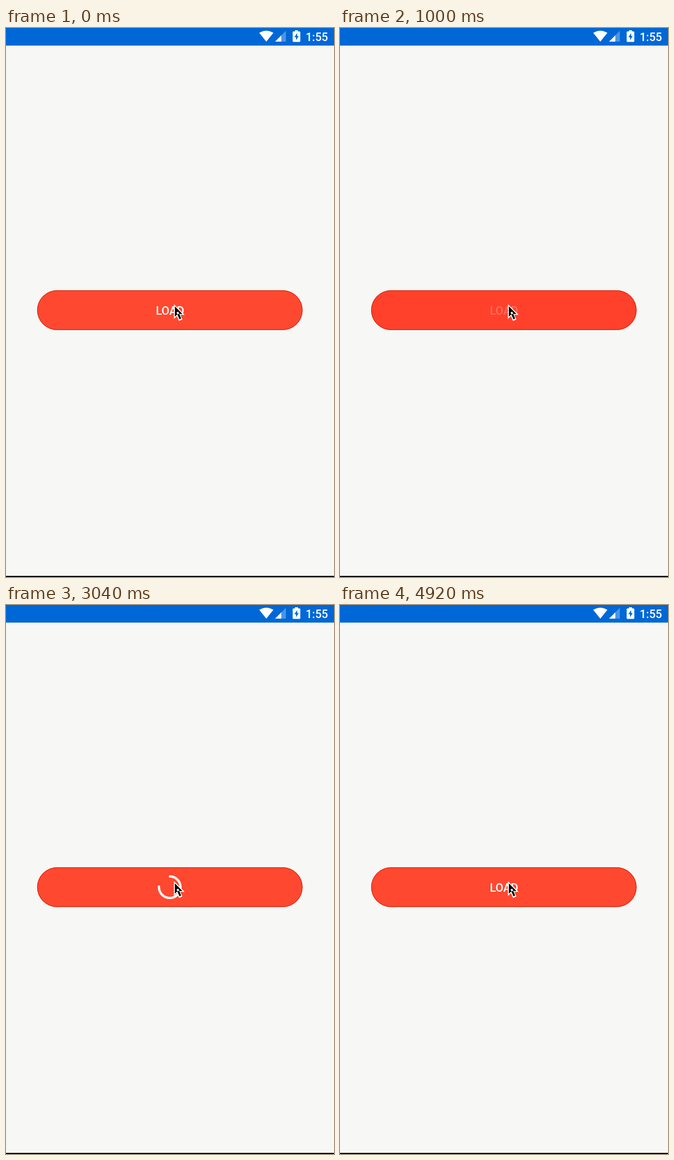
These frames come from a looping animation (579 px wide and 967 px high, 4960 ms). An HTML page:

```html
<!DOCTYPE html>
<html lang="en">
<head>
<meta charset="utf-8">
<title>Loading button</title>
<style>
  html, body { margin: 0; width: 100%; height: 100%; overflow: hidden; background: #f7f7f5; }
  svg { display: block; width: 579px; height: 967px; }
  text { font: 500 20px Roboto, sans-serif; fill: #fff; }
</style>
</head>
<body>
<svg viewBox="0 0 579 967">
  <rect width="579" height="967" fill="#f7f7f5"/>
  <rect width="579" height="31" fill="#0068d6"/>
  <rect y="965" width="579" height="2" fill="#000"/>

  <g fill="#fff">
    <path d="M459.5 24 L447 8.5 Q459.5 0.8 472 8.5 Z"/>
    <path d="M475 24 H494 V5 Z" opacity=".3"/>
    <path d="M475 24 H486 V13 Z"/>
    <path d="M510 4 H515.5 V6 H518 Q519.5 6 519.5 7.5 V23 Q519.5 24.5 518 24.5 H507.5 Q506 24.5 506 23 V7.5 Q506 6 507.5 6 H510 Z"/>
  </g>
  <path d="M514 9 L509 16.3 H512 V21.5 L516.7 14.2 H514 Z" fill="#0068d6"/>
  <text x="529" y="22.5">1:55</text>

  <rect x="55" y="462" width="468.5" height="70" rx="35" fill="#ff4830"/>
  <rect id="press" x="55" y="462" width="468.5" height="70" rx="35" fill="#f00"/>
  <rect x="55.5" y="462.5" width="467.5" height="69" rx="34.5" fill="none" stroke="#d01c04"/>
  <text id="label" x="289.5" y="504.5" text-anchor="middle">LOAD</text>
  <path id="spinner" fill="none" stroke="#fff" stroke-width="4" stroke-linecap="square"/>

  <g id="ring" fill="none">
    <circle cx="297.5" cy="490.3" stroke="#fff" stroke-width="4.2"/>
    <circle cx="297.5" cy="490.3" stroke="#000" stroke-width="2.4"/>
  </g>
  <g transform="translate(283.1 478.4) scale(1.63)">
    <path fill="#fff" d="M8.2 20.9V4.9L19.8 16.5H13L12.6 16.6Z M17.3 21.6L13.7 23.1L9 12L12.7 10.5Z"/>
    <path d="M9.2 7.3V18.5L12.2 15.6L12.6 15.5H17.4Z M11 13.8L12.9 13L16 20.4L14.1 21.2Z"/>
  </g>
</svg>
<script>
const LOOP = 4960;
const PRESS = 665, RELEASE = 790;
const SPIN_IN = 1070, SPIN_OUT = 4570, FADE = 300;
const TRIM = 1333, TURN = 2222;
const CX = 289, CY = 497, R = 19;

const [press, label, spinner, ring] =
  ['press', 'label', 'spinner', 'ring'].map(id => document.getElementById(id));

const ramp = (t, a, b) => Math.min(1, Math.max(0, (t - a) / (b - a)));

// Cubic easing from (0,0) to (1,1) with control points (x1,0) and (x2,1).
function ease(x, x1, x2) {
  let lo = 0, hi = 1;
  for (let i = 0; i < 20; i++) {
    const s = (lo + hi) / 2, u = 1 - s;
    if (3 * u * u * s * x1 + 3 * u * s * s * x2 + s * s * s < x) lo = s;
    else hi = s;
  }
  return lo * lo * (3 - 2 * lo);
}

function point(deg) {
  const a = deg * Math.PI / 180;
  return `${(CX + R * Math.sin(a)).toFixed(3)} ${(CY - R * Math.cos(a)).toFixed(3)}`;
}

// The head runs ahead in the first half of a cycle, the tail follows in the second.
function spinnerPath(ms) {
  const p = ms % TRIM / TRIM;
  const base = ms / TURN * 360 + p * 90;
  const head = 270 * ease(ramp(p, 0, 0.5), 0.4, 0.2);
  const tail = 270 * ease(ramp(p, 0.5, 1), 0.4, 0.2);
  const end = Math.max(head, tail + 0.5);
  return `M${point(base + tail)}A${R} ${R} 0 ${end - tail > 180 ? 1 : 0} 1 ${point(base + end)}`;
}

function draw(t) {
  press.style.opacity = ramp(t, PRESS, PRESS + 35) * (1 - ramp(t, RELEASE, 1025));
  label.style.opacity = t < SPIN_OUT
    ? 1 - ramp(t, SPIN_IN - FADE, SPIN_IN)
    : ramp(t, SPIN_OUT, SPIN_OUT + FADE);

  const spinning = t >= SPIN_IN && t < SPIN_OUT;
  spinner.style.visibility = spinning ? 'visible' : 'hidden';
  if (spinning) spinner.setAttribute('d', spinnerPath(t - SPIN_IN));

  const clicked = t >= PRESS && t < RELEASE;
  ring.style.visibility = clicked ? 'visible' : 'hidden';
  if (clicked) {
    const r = 11.5 + 0.27 * (t - PRESS);
    for (const c of ring.children) c.setAttribute('r', r);
    ring.style.opacity = 1 - ramp(t, RELEASE - 35, RELEASE);
  }
}

const start = performance.now();
function tick() {
  draw((performance.now() - start) % LOOP);
  requestAnimationFrame(tick);
}
tick();
</script>
</body>
</html>
```
